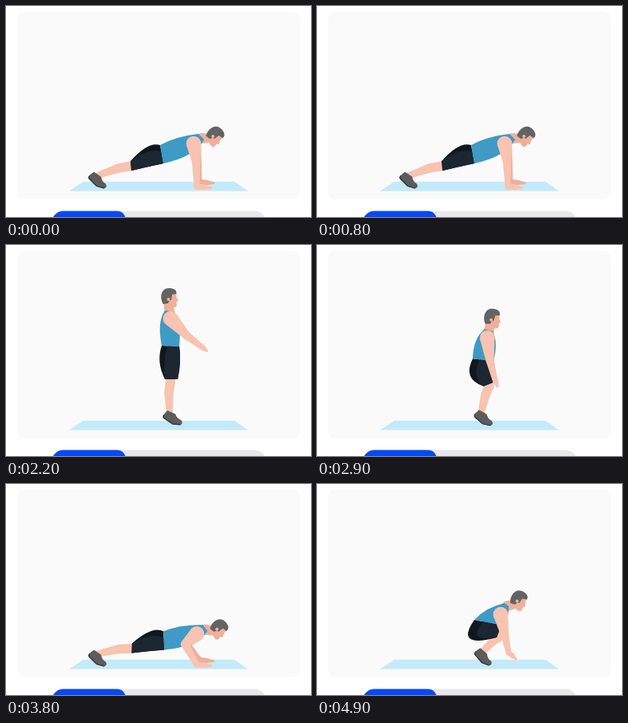
Animation of 382 by 264 pixels, one loop 5 s. Source, as an HTML page with a canvas:

```html
<!DOCTYPE html>
<html lang="en">
<head>
<meta charset="utf-8">
<title>Burpee</title>
<style>
  html, body { margin: 0; width: 100%; height: 100%; overflow: hidden; background: #fff; }
  canvas { display: block; width: 382px; height: 264px; }
</style>
</head>
<body>
<canvas id="stage"></canvas>
<script>
const W = 382, H = 264, LOOP = 5000, STEP = 100;
const SKIN = '#f8c3b0', SHADE = '#efb09b', BLUE = '#3f9ac6', DARK = '#10171d',
      CLOTH = '#1c2731', HAIR = '#636363', SHOE = '#5c5c5c';

const canvas = document.getElementById('stage');
const ctx = canvas.getContext('2d');
const dpr = window.devicePixelRatio || 1;
canvas.width = W * dpr;
canvas.height = H * dpr;

// Poses. torso: waist back, back curve, neck back, neck front, chest curve, waist front.
// shorts: seat curve, hem back, hem front, front curve. leg: knee, ankle.
// arm: shoulder, elbow, wrist. rot: head, foot, hand angles and spread of the far arm.
const plank = {
  torso: [193, 174, 213, 163, 241, 160, 248, 167, 238, 188, 197, 197],
  shorts: [178, 169, 156, 194, 157, 206, 178, 201],
  leg: [158, 200, 112, 213],
  head: [261, 162],
  arm: [235, 172, 238, 195, 239, 226],
  rot: [46, 40, 5, 6]
};
const tuck = {
  ...plank,
  torso: [201, 166, 223, 159, 242, 160, 248, 167, 237, 192, 214, 186],
  shorts: [163, 180, 205, 204, 222, 200, 216, 190],
  leg: [218, 207, 178, 206],
  rot: [46, 95, 5, 6]
};
const lean = {
  torso: [197, 170, 212, 154, 235, 149, 240, 153, 241, 171, 229, 176],
  shorts: [172, 206, 225, 192, 230, 179, 229, 178],
  leg: [234, 187, 206, 211],
  head: [252, 145],
  arm: [230, 163, 235, 188, 240, 211],
  rot: [27, 45, 40, 1]
};
const squat = {
  torso: [195, 171, 207, 153, 229, 146, 236, 150, 240, 164, 228, 177],
  shorts: [172, 206, 225, 192, 229, 180, 229, 178],
  leg: [233, 187, 206, 211],
  head: [245, 137],
  arm: [226, 158, 233, 183, 243, 211],
  rot: [20, 45, 53, 0]
};
const tall = {
  torso: [195, 126, 189, 96, 199, 82, 211, 84, 220, 98, 217, 127],
  shorts: [188, 146, 199, 168, 215, 168, 220, 145],
  leg: [206, 170, 205, 212],
  head: [204, 66],
  arm: [206, 92, 226, 113, 243, 126],
  rot: [0, 30, 37, 0]
};

const rad = d => d * Math.PI / 180;
const lerp = (a, b, k) => a + (b - a) * k;

function mix(a, b, k) {
  const out = {};
  for (const key in a) out[key] = a[key].map((v, i) => lerp(v, b[key][i], k));
  return out;
}

function mapPoints(pose, fn) {
  const out = { rot: pose.rot };
  for (const key in pose) {
    if (key === 'rot') continue;
    out[key] = [];
    for (let i = 0; i < pose[key].length; i += 2) out[key].push(...fn(pose[key][i], pose[key][i + 1]));
  }
  return out;
}

const lift = (pose, dy) => mapPoints(pose, (x, y) => [x, y - dy]);

function swing(pose, deg) {
  const [, , px, py] = pose.leg, c = Math.cos(rad(deg)), s = Math.sin(rad(deg));
  return mapPoints(pose, (x, y) => [px + (x - px) * c - (y - py) * s, py + (x - px) * s + (y - py) * c]);
}

function reach(pose, deg, foot = 30) {
  const [sx, sy] = pose.arm, bend = deg - 8;
  const ex = sx + 29 * Math.cos(rad(deg)), ey = sy + 29 * Math.sin(rad(deg));
  const wx = ex + 21 * Math.cos(rad(bend)), wy = ey + 21 * Math.sin(rad(bend));
  return { ...pose, arm: [sx, sy, ex, ey, wx, wy], rot: [0, foot, bend, 0] };
}

const low = swing(plank, 8);
low.arm = [...low.arm.slice(0, 2), 222, 201, 239, 226];
const hop = mix(plank, tuck, 0.65);
const land = { ...mix(tuck, lean, 0.6), leg: lean.leg, shorts: lean.shorts };
const rest = reach(tall, 88);

const track = [
  [0, plank], [400, low], [780, plank], [1060, mix(plank, tuck, 0.04)], [1200, hop],
  [1330, land], [1450, lean], [1500, squat],
  [1700, reach(tall, -10)], [1800, reach(lift(tall, 9), -75, 45)],
  [1900, reach(lift(tall, 17), -84, 50)], [2000, reach(lift(tall, 9), -62, 42)],
  [2100, reach(tall, 0)], [2200, tall], [2300, rest], [2750, rest],
  [2850, mix(rest, squat, 0.15)], [3050, squat], [3120, lean], [3200, land],
  [3300, tuck], [3450, plank], [3850, low], [4230, plank],
  [4510, mix(plank, tuck, 0.04)], [4650, hop], [4780, land], [4900, lean], [5000, lean]
];

function poseAt(t) {
  let i = 0;
  while (i < track.length - 2 && track[i + 1][0] <= t) i++;
  const [t0, a] = track[i], [t1, b] = track[i + 1];
  return mix(a, b, (t - t0) / (t1 - t0));
}

function fillPath(d, color) {
  ctx.fillStyle = color;
  ctx.fill(new Path2D(d));
}

// Limb made of round-ended tapered pieces; nodes are [x, y, radius].
function limb(nodes, color) {
  ctx.fillStyle = color;
  nodes.forEach(([x, y, r], i) => {
    ctx.beginPath();
    ctx.arc(x, y, r, 0, 7);
    ctx.fill();
    if (!i) return;
    const [u, v, q] = nodes[i - 1];
    const a = Math.atan2(y - v, x - u), nx = -Math.sin(a), ny = Math.cos(a);
    ctx.beginPath();
    ctx.moveTo(u + nx * q, v + ny * q);
    ctx.lineTo(x + nx * r, y + ny * r);
    ctx.lineTo(x - nx * r, y - ny * r);
    ctx.lineTo(u - nx * q, v - ny * q);
    ctx.fill();
  });
}

function local(x, y, deg, draw) {
  ctx.save();
  ctx.translate(x, y);
  ctx.rotate(rad(deg));
  draw();
  ctx.restore();
}

function drawArm(arm, hand, far, color, dx, dy) {
  const [sx, sy, ex, ey, wx, wy] = arm, len = 11 + far * 1.2;
  const x = wx + dx, y = wy + dy, hx = len * Math.cos(rad(hand)), hy = len * Math.sin(rad(hand));
  limb([[sx, sy, 9.3], [ex + dx / 2, ey, 5.2], [x, y, 3.4]], color);
  limb([[x, y, 3.4], [x + hx * 0.5, y + hy * 0.5, 3.1], [x + hx, y + hy, 1.4]], color);
}

function drawHead() {
  fillPath('M-6 -6 L9 -7 L9.5 -1 L12 4 L9.5 5 L10 9 Q9 12.5 6 12 L-3 10 Z', SHADE);
  fillPath('M-7 8 C-12 0 -10 -12 0 -12 C6 -12 10 -10 9.5 -5 L4 -4 L3 3 L1 3 L-1 7 Z', HAIR);
  limb([[-0.5, 2, 2]], SHADE);
}

function drawShoe() {
  fillPath('M-5 -3 Q-8 8 -4 8 L9 9 L18 5 Q21 1 16 -1 Q10 0 6 -4 Z', SHOE);
  ctx.strokeStyle = '#333';
  ctx.lineWidth = 1.2;
  ctx.stroke(new Path2D('M-6 4 Q-6 7.5 -3 7.5 L9 8.5 L18 4.5'));
}

function drawFigure({ torso: t, shorts: s, leg, head, arm, rot }) {
  const [tilt, foot, hand, far] = rot;
  const [kx, ky, ax, ay] = leg, [hx, hy] = head;
  const a = rad(tilt);

  if (far > 1) drawArm(arm, hand, far, SHADE, far * 0.5, -far);

  limb([[hx - Math.cos(a) - 6 * Math.sin(a), hy - Math.sin(a) + 6 * Math.cos(a), 5.5],
    [(t[4] + t[6]) / 2, (t[5] + t[7]) / 2 + 2, 6.5]], SHADE);
  local(hx, hy, tilt, drawHead);

  const calfX = lerp(kx, ax, 0.36) - 0.04 * (ay - ky), calfY = lerp(ky, ay, 0.36) + 0.04 * (ax - kx);
  limb([[kx, ky, 6], [calfX, calfY, 5.7], [ax, ay, 3.8]], SKIN);
  local(ax, ay, foot, drawShoe);

  fillPath(`M${t[0]} ${t[1]} Q${s[0]} ${s[1]} ${s[2]} ${s[3]} L${s[4]} ${s[5]}
    Q${s[6]} ${s[7]} ${t[10]} ${t[11]} Z`, DARK);
  const mx = lerp(t[0], t[10], 0.35), my = lerp(t[1], t[11], 0.35);
  const bx = lerp(s[0], s[6], 0.25), by = lerp(s[1], s[7], 0.25);
  fillPath(`M${mx} ${my} Q${bx} ${by} ${s[2]} ${s[3]} L${s[4]} ${s[5]}
    Q${s[6]} ${s[7]} ${t[10]} ${t[11]} Z`, CLOTH);

  fillPath(`M${t[0]} ${t[1]} Q${t[2]} ${t[3]} ${t[4]} ${t[5]} L${t[6]} ${t[7]}
    Q${t[8]} ${t[9]} ${t[10]} ${t[11]} Z`, BLUE);
  drawArm(arm, hand, far, SKIN, 0, 0);
}

function box(x, y, w, h, r, color) {
  ctx.fillStyle = color;
  ctx.beginPath();
  ctx.roundRect(x, y, w, h, r);
  ctx.fill();
}

function render(t) {
  ctx.setTransform(dpr, 0, 0, dpr, 0, 0);
  ctx.fillStyle = '#fff';
  ctx.fillRect(0, 0, W, H);
  box(14, 7, 354, 235, 9, '#fafafa');
  box(57, 256.6, 269, 34, 15, '#e7e7ec');
  box(57, 256.6, 93, 34, [15, 11, 11, 15], '#0549f8');
  fillPath('M97 219.700 H286 L303 231.400 H79 Z', '#c3eafa');
  drawFigure(poseAt(t));
}

const start = performance.now();
function tick() {
  const t = (performance.now() - start) % LOOP;
  render(Math.floor(t / STEP) * STEP);
  requestAnimationFrame(tick);
}
tick();
</script>
</body>
</html>
```
